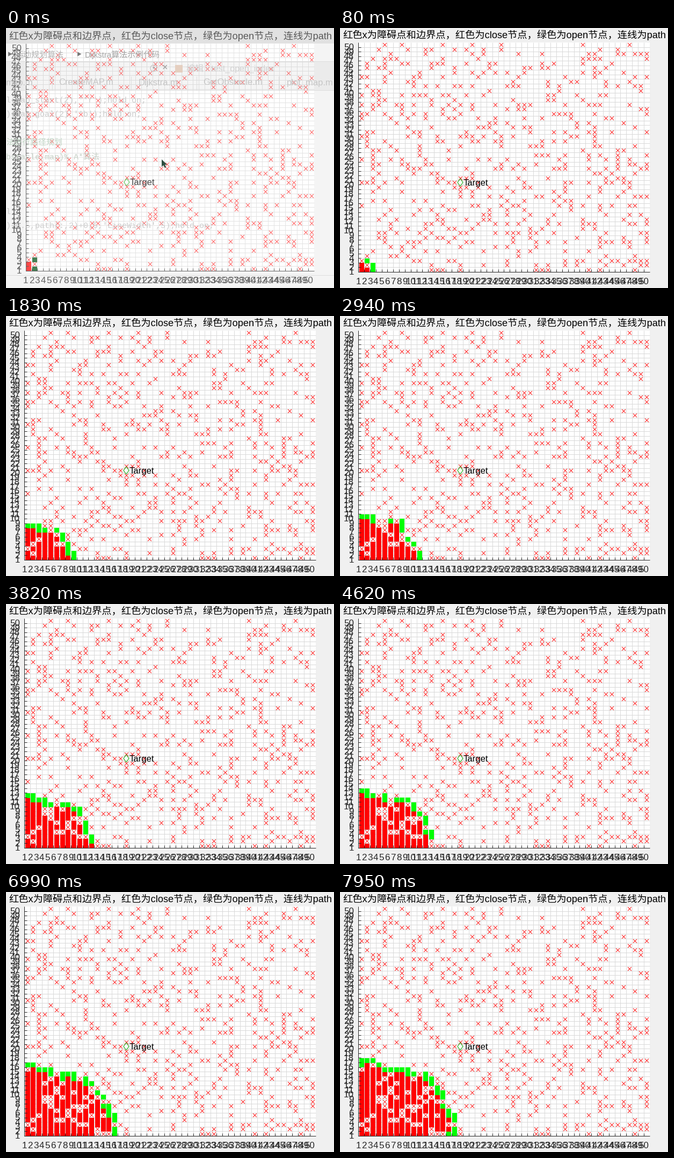
Animation, 611 px wide and 485 px high, one loop 8000 ms. Source, as a matplotlib script:

```python
import math

import matplotlib.pyplot as plt
import numpy as np
from matplotlib.animation import FuncAnimation
from matplotlib.patches import Circle, Polygon, Rectangle

W, H, DPI = 611, 485, 64
N = 50
X0, Y0 = 34.1, 455.0
DX, DY = 10.85, 8.56
LOOP, TICK = 8000, 40
STEP_MS = 79.45
PT = 72 / DPI
SANS = ["Liberation Sans", "Noto Sans CJK JP", "DejaVu Sans"]
MONO = ["Liberation Mono", "Noto Sans CJK JP"]
TARGET = (18, 20)
DARK = "#262626"

# Obstacles near the start, as column: rows; the rest are random.
WALLS = {
    1: [3, 15], 2: [2, 4], 3: [5, 16, 18], 4: [8, 9, 12],
    5: [7, 8, 9, 13, 16], 6: [4, 6, 10, 11, 14], 7: [4, 9, 12],
    8: [5, 6, 18], 9: [4, 7, 10], 10: [3, 6, 7, 13, 16],
    11: [3, 7, 9, 14], 12: [5, 8, 10, 11, 16], 13: [1, 2, 9, 11, 14],
    14: [1, 5, 8, 12, 13], 15: [1, 8, 11, 12, 15, 18], 16: [3, 7, 10, 14],
}
MOVES = [(0, 1), (1, 0), (0, -1), (-1, 0), (1, 1), (-1, 1), (1, -1), (-1, -1)]


def make_walls():
    rng = np.random.default_rng(12)
    walls = {(c, r) for c, rows in WALLS.items() for r in rows}
    for c in range(1, N + 1):
        for r in range(1, N + 1):
            hit = rng.random() < 0.235
            if hit and (c > 16 or r > 18):
                walls.add((c, r))
    walls |= {(18, 21), (19, 21), (14, 21), (15, 21)}
    walls.discard(TARGET)
    return walls


def dijkstra(walls, count):
    """Return (closed, open) cells after each expansion."""
    cost = {(1, 1): 0.0}
    frontier, closed, steps = [(1, 1)], [], [([], [(1, 1)])]
    for _ in range(count):
        node = min(frontier, key=cost.get)
        frontier.remove(node)
        closed.append(node)
        for dc, dr in MOVES:
            cell = (node[0] + dc, node[1] + dr)
            inside = 1 <= cell[0] <= N and 1 <= cell[1] <= N
            if not inside or cell in walls or cell in closed:
                continue
            new = round(cost[node] + math.hypot(dc, dr), 6)
            if cell not in cost:
                frontier.append(cell)
            cost[cell] = min(new, cost.get(cell, new))
        steps.append((list(closed), list(frontier)))
    return steps


def centers(cells):
    c = np.array(sorted(cells), float).reshape(-1, 2)
    return np.column_stack([X0 + DX * (c[:, 0] - 0.5), Y0 - DY * (c[:, 1] - 0.5)])


def pixel_axes(zorder):
    ax = fig.add_axes([0, 0, 1, 1], zorder=zorder)
    ax.set(xlim=(0, W), ylim=(H, 0))
    ax.axis("off")
    ax.set_autoscale_on(False)
    return ax


def write(ax, x, y, text, size, color=DARK, ha="left", family=SANS, **kw):
    return ax.text(x, y, text, fontsize=size * PT, color=color, ha=ha,
                   va="center", family=family, **kw)


def segments(ax, lines, color, width=1.0, zorder=1):
    xs, ys = [], []
    for xa, ya, xb, yb in lines:
        xs += [xa, xb, np.nan]
        ys += [ya, yb, np.nan]
    ax.plot(xs, ys, color=color, lw=width * PT, zorder=zorder,
            solid_capstyle="butt")


def draw_board(ax, walls):
    right, top = X0 + N * DX, Y0 - N * DY
    ax.add_patch(Rectangle((X0, top), N * DX, N * DY, fc="white", lw=0, zorder=0))
    xs = [X0 + DX * i for i in range(N)]
    ys = [Y0 - DY * i for i in range(N)]
    segments(ax, [(x, top, x, Y0) for x in xs], "#d9d9d9")
    segments(ax, [(X0, y, right, y) for y in ys], "#d9d9d9")
    segments(ax, [(X0, top, X0, Y0), (X0, Y0, right, Y0)], DARK, zorder=4)
    segments(ax, [(x, Y0 - 5, x, Y0) for x in xs], DARK, zorder=4)
    segments(ax, [(X0, y, X0 + 5, y) for y in ys], DARK, zorder=4)
    for i in range(N):
        write(ax, xs[i], 473.5, str(i + 1), 17, ha="center")
        write(ax, 26, ys[i] + 1, str(i + 1), 17, ha="right")

    p = centers(walls)
    ax.scatter(p[:, 0], p[:, 1], marker="x", s=(7 * PT) ** 2, c="red",
               linewidths=0.9 * PT, zorder=3)
    tx, ty = centers([TARGET])[0]
    ax.add_patch(Polygon([(tx, ty - 7), (tx + 5, ty), (tx, ty + 7), (tx - 5, ty)],
                         fill=False, ec="#10b010", lw=PT, zorder=5))
    write(ax, tx + 5.5, ty + 1, "Target", 16.6, "black", zorder=6)
    write(ax, 306, 13, "红色x为障碍点和边界点，红色为close节点，"
          "绿色为open节点，连线为path", 18.2, "black", ha="center")


def draw_ghost(ax):
    """Faint editor window seen through the plot while it opens."""
    ax.add_patch(Rectangle((0, 0), W, H, fc="white", alpha=0.28, lw=0))
    ax.add_patch(Rectangle((0, 0), W, 29, fc="#a0a0a0", alpha=0.22, lw=0))
    ax.add_patch(Rectangle((0, 62), W, 54, fc="#b0b0b0", alpha=0.12, lw=0))
    segments(ax, [(0, 62, W, 62), (0, 116, W, 116), (0, 461, W, 461)], "#dddddd")
    segments(ax, [(x, 90, x, 116) for x in (86, 233, 355, 508)], "#dddddd")
    for x, text in ((3, "▶"), (132, "▶")):
        write(ax, x, 50, text, 9, "#777777")
    write(ax, 18, 50, "运动规划算法", 15, "#b4b4b4")
    write(ax, 147, 50, "Dijkstra算法示例代码", 15, "#a4a4a4")

    ax.add_patch(Circle((275, 75), 6, fill=False, ec="#bbbbbb", lw=PT))
    write(ax, 275, 75, "▾", 9, "#aaaaaa", ha="center")
    write(ax, 296, 75, "×", 18, "#999999", ha="center")
    ax.add_patch(Rectangle((315, 69), 14, 14, fc="#e5cfc0", lw=0))
    write(ax, 336, 76, "编辑 - test_open_index", 16, "#d2d2d2")
    tabs = [(0, "map.m"), (98, "CreateMAP.m"), (247, "Dijkstra.m"),
            (367, "GetObstacle.m"), (523, "plot_map.m")]
    for x, text in tabs:
        write(ax, x, 102, text, 16.5, "#c6c6c6")

    code = [(135, "l(map_start(2),'*r');hold on;", "#cccccc"),
            (161, ")(map.goal(2),'*b');hold on;", "#cccccc"),
            (213, "法进行路径规划", "#c4d8c8"),
            (240, "bstacle,map)% A*算法", "#c8d2c8"),
            (343, "l", "#cccccc"),
            (369, ")+0.5,path(:,2)+0.5,'LineWidth',5);hold on;", "#cccccc")]
    for y, text, color in code:
        write(ax, 0, y, text, 15, color, family=MONO)

    arrow = [(0, 0), (0, 14), (3, 11), (6, 16), (8, 15), (6, 10), (10, 10)]
    ax.add_patch(Polygon([(290 + x, 245 + y) for x, y in arrow],
                         fc="#2f4f40", lw=0))


def squares(ax):
    return ax.scatter([], [], marker="s", s=(9 * PT) ** 2, linewidths=0,
                      antialiased=False, zorder=2)


fig = plt.figure(figsize=(W / DPI, H / DPI), dpi=DPI, facecolor="#f0f0f0")
board, ghost = pixel_axes(1), pixel_axes(2)
obstacles = make_walls()
draw_board(board, obstacles)
draw_ghost(ghost)
closed_dots, open_dots = squares(board), squares(board)
closed_dots.set_facecolor("red")
history = dijkstra(obstacles, 156)


def update(i):
    step = int((i * TICK + 35) / STEP_MS)
    closed, frontier = history[int(2 + 1.5 * step)]
    closed_dots.set_offsets(centers(closed))
    open_dots.set_offsets(centers(frontier))

    opening = step == 0
    pad = 0.005 if opening else 0
    board.set_xlim(-W * pad, W * (1 + pad))
    board.set_ylim(H * (1 + pad), -H * pad)
    open_dots.set_facecolor("#005014" if opening else "#00ff00")
    ghost.set_visible(opening)
    return closed_dots, open_dots


anim = FuncAnimation(fig, update, frames=LOOP // TICK, interval=TICK,
                     repeat=True, repeat_delay=0, blit=False)
plt.show()
```
